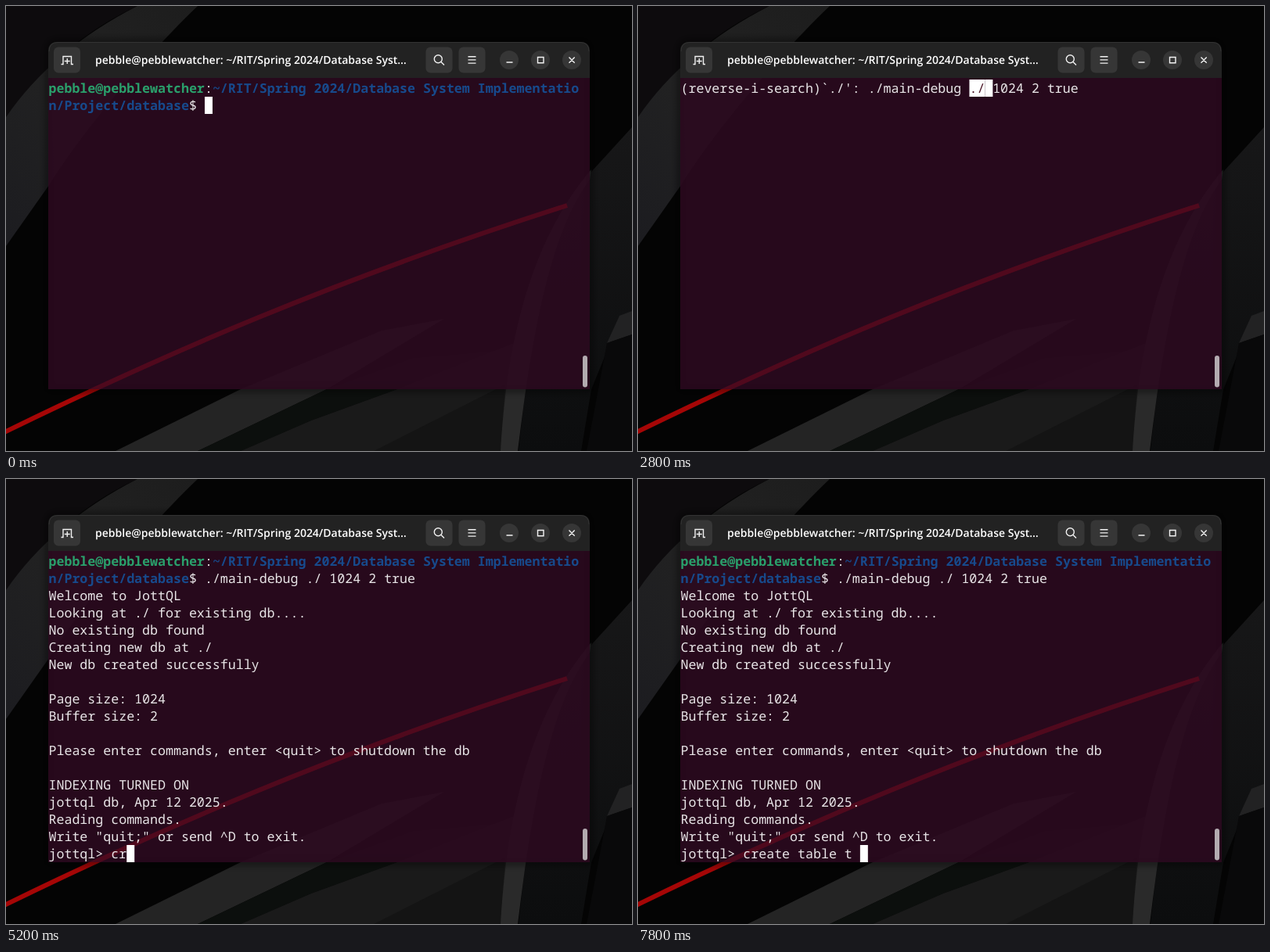
Write an HTML page that moves like this. It is 800 px wide and 569 px high and loops after 8 s.

```html
<!DOCTYPE html>
<html lang="en">
<head>
<meta charset="utf-8">
<title>Terminal session</title>
<style>
  html, body { margin: 0; width: 100%; height: 100%; overflow: hidden; background: #040404; }
  svg { display: block; width: 100%; height: 100%; }
  text { white-space: pre; text-rendering: geometricPrecision; }
  #screen { font: 16.62px "Noto Sans Mono", "DejaVu Sans Mono", monospace; fill: #e9e6e8; }
  #screen .user { fill: #2a9f6b; font-weight: 700; }
  #screen .path { fill: #174a8c; font-weight: 700; }
  #screen .block { fill: #fff; }
  #screen .under { fill: #4a1526; }
  #title { font: 600 14px "Open Sans", "Noto Sans", sans-serif; fill: #fff; }
  .icon { fill: none; stroke: #f2f2f2; stroke-width: 1.4; }
</style>
</head>
<body>
<svg viewBox="0 0 800 569" xmlns="http://www.w3.org/2000/svg">
  <defs>
    <linearGradient id="band" x1="0" y1="1" x2="1" y2="0">
      <stop offset="0" stop-color="#1c1c20"/>
      <stop offset=".5" stop-color="#222"/>
      <stop offset="1" stop-color="#1d1d1d"/>
    </linearGradient>
    <linearGradient id="sweep" x1="0" y1="0" x2="0" y2="1">
      <stop offset="0" stop-color="#171718"/>
      <stop offset="1" stop-color="#0c0d0e"/>
    </linearGradient>
    <filter id="blur" x="-10%" y="-10%" width="120%" height="120%">
      <feGaussianBlur stdDeviation="5"/>
    </filter>
    <clipPath id="body"><rect x="54" y="92" width="692" height="398"/></clipPath>
  </defs>

  <!-- wallpaper -->
  <rect width="800" height="569" fill="#040404"/>
  <path d="M0 0H168Q70 45 0 142Z" fill="#0d0b0d"/>
  <path d="M168 0H245C190 52 105 150 55 229L0 307V142Q60 55 168 0Z" fill="url(#band)"/>
  <path d="M800 155L748 212C700 275 672 400 655 569H735L748 490L785 400L800 390Z" fill="url(#sweep)"/>
  <path d="M800 390L784 396L768 431L800 420Z" fill="#222223"/>
  <path d="M768 431L800 420V569H742Z" fill="#09090a"/>
  <path d="M140 569L300 490L480 415L560 400L410 490L245 569Z" fill="#242424"/>
  <path d="M245 569L410 490L520 450L640 440L500 490L390 530L300 569Z" fill="#0c0f0d"/>
  <path d="M300 569L390 530L500 490L652 430L632 569Z" fill="#1a1a1a"/>
  <path d="M470 569L638 484L632 569Z" fill="#141414"/>
  <path d="M632 569C640 430 670 300 748 209L746 222C695 290 672 420 654 569Z" fill="#2a2a2a"/>
  <path d="M-2 545C200 446 420 350 717 255" fill="none" stroke="#a50606" stroke-width="6"/>

  <!-- window -->
  <path d="M54 58Q54 46 66 46H734Q746 46 746 58V490H54Z" fill="none" stroke="#000" stroke-opacity=".6" stroke-width="6" filter="url(#blur)"/>
  <rect x="54" y="92" width="692" height="398" fill="#2c0a20" opacity=".87"/>
  <path d="M-2 545C200 446 420 350 717 255" fill="none" stroke="#6a0a20" stroke-opacity=".45" stroke-width="6" clip-path="url(#body)"/>
  <path d="M54 92V58Q54 46 66 46H734Q746 46 746 58V92Z" fill="#222"/>
  <path d="M55 58Q55 46.5 66 46.5H734Q745 46.5 745 58" fill="none" stroke="#333"/>
  <g fill="#363636">
    <rect x="61" y="52.5" width="34" height="33" rx="6"/>
    <rect x="536.5" y="52.5" width="34" height="33" rx="6"/>
    <rect x="578.5" y="52.5" width="34" height="33" rx="6"/>
    <circle cx="643" cy="69" r="12"/>
    <circle cx="683" cy="69" r="12"/>
    <circle cx="723" cy="69" r="12"/>
  </g>
  <path class="icon" d="M70.500 74.500H73V64.500H83.500V74.500H86M78.250 67V74M74.750 70.500H81.750"/>
  <circle class="icon" cx="552.300" cy="67.800" r="5"/>
  <path class="icon" d="M556 71.500L560 75.500M590.500 64.700H600.500M590.500 68.900H600.500M590.500 73.100H600.500"/>
  <path class="icon" d="M639.500 72H647.500M679.500 65.500H687V72.800H679.500ZM719.500 65.500L726.700 72.700M726.700 65.500L719.500 72.700"/>
  <text id="title" x="114" y="74">pebble@pebblewatcher: ~/RIT/Spring 2024/Database Syst…</text>
  <g id="screen"></g>
  <rect x="737" y="447" width="6" height="40.500" rx="3" fill="#b3abb0"/>
</svg>

<script>
const NS = "http://www.w3.org/2000/svg";
const LOOP = 8000, LEFT = 54.5, TOP = 94, CELL = 9.972, LINE = 22;
const COMMAND = "./main-debug ./ 1024 2 true";
const QUERY = "create table t ";
const OUTPUT = [
  "Welcome to JottQL",
  "Looking at ./ for existing db....",
  "No existing db found",
  "Creating new db at ./",
  "New db created successfully",
  "",
  "Page size: 1024",
  "Buffer size: 2",
  "",
  "Please enter commands, enter <quit> to shutdown the db",
  "",
  "INDEXING TURNED ON",
  "jottql db, Apr 12 2025.",
  "Reading commands.",
  'Write "quit;" or send ^D to exit.',
  "jottql> "
];
// [start time, characters typed]
const KEYS = [[3600, 0], [4800, 1], [5200, 2], [5400, 3], [5600, 5], [5800, 6], [6000, 8],
  [6200, 9], [6800, 10], [7000, 11], [7200, 12], [7400, 13], [7600, 14], [7800, 15]];

const screen = document.getElementById("screen");

function add(tag, attrs, content = "") {
  const node = document.createElementNS(NS, tag);
  for (const name in attrs) node.setAttribute(name, attrs[name]);
  node.textContent = content;
  screen.append(node);
}

function put(col, row, str, cls = "") {
  add("text", { x: LEFT + col * CELL, y: TOP + row * LINE + 16.5, class: cls }, str);
}

// Inverse cells: the cursor or a search match.
function block(col, row, str = " ") {
  add("rect", {
    x: LEFT + col * CELL, y: TOP + row * LINE,
    width: str.length * CELL, height: LINE, class: "block"
  });
  put(col, row, str, "under");
}

function prompt(command = "") {
  put(0, 0, "pebble@pebblewatcher", "user");
  put(20, 0, ":");
  put(21, 0, "~/RIT/Spring 2024/Database System Implementatio", "path");
  put(0, 1, "n/Project/database", "path");
  put(18, 1, "$ " + command);
}

function search(pattern) {
  const head = "(reverse-i-search)`" + pattern + "': ";
  const found = pattern ? COMMAND : "";
  const at = found.lastIndexOf(pattern), end = at + pattern.length;
  put(0, 0, head + found);
  if (pattern) block(head.length + at, 0, pattern);
  block(head.length + end, 0, found[end]);
}

function session(count, cursor) {
  prompt(COMMAND);
  OUTPUT.forEach((line, i) => put(0, i + 2, line));
  put(8, 17, QUERY.slice(0, count));
  if (cursor) block(8 + count, 17);
}

function stateAt(t) {
  if (t < 2400) return ["idle", t < 400 || (t >= 1000 && t < 1600) || t >= 2000];
  if (t < 3200) return ["search", "./m".slice(0, Math.floor((t - 2400) / 200))];
  if (t < 3600) return ["ready"];
  const count = KEYS.filter(key => key[0] <= t).pop()[1];
  return ["session", count, t < 4200 || t >= 4800];
}

const views = {
  idle(cursor) { prompt(); if (cursor) block(20, 1); },
  search,
  ready() { prompt(COMMAND); block(23, 1, "a"); },
  session
};

let shown = "";
function render(t) {
  const [view, ...args] = stateAt(t);
  const key = view + args;
  if (key === shown) return;
  shown = key;
  screen.replaceChildren();
  views[view](...args);
}

const start = performance.now();
function tick() {
  render((performance.now() - start) % LOOP);
  requestAnimationFrame(tick);
}
tick();
</script>
</body>
</html>
```
